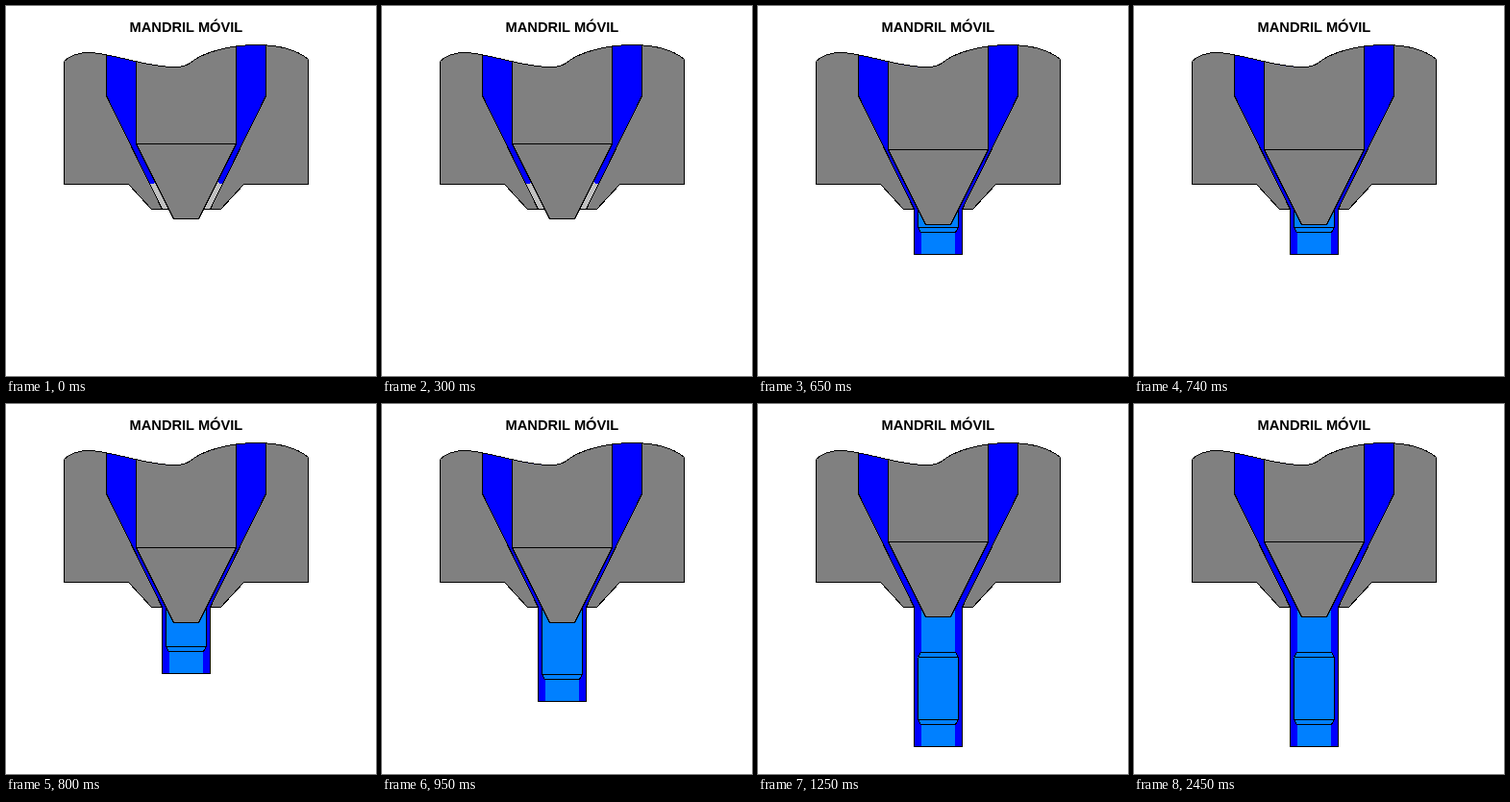
An HTML page that plays this animation: 385x385 px, repeating every 3250 ms.

```html
<!DOCTYPE html>
<html lang="es">
<head>
<meta charset="utf-8">
<title>Mandril móvil</title>
<style>
html, body { margin: 0; width: 100%; height: 100%; overflow: hidden; background: #fff; }
svg { display: block; }
.shape { shape-rendering: crispEdges; fill: none; }
.line { stroke: #000; stroke-width: 1; }
.steel { fill: #808080; }
.melt { fill: #00f; }
.bore { fill: #0080ff; }
text { font: bold 14.67px "Liberation Sans", Arial, sans-serif; }
</style>
</head>
<body>
<svg width="385" height="385" viewBox="0 0 385 385">
  <defs>
    <clipPath id="below"><path id="belowPath"/></clipPath>
  </defs>
  <text x="128.5" y="27">MANDRIL MÓVIL</text>
  <g class="shape" transform="translate(.5 .5)">
    <g clip-path="url(#below)">
      <path class="steel" d="M60 0V185H127L151 211H223L247 185H314V0Z"/>
      <path id="funnel" d="M104 0V93L162 211H212L270 93V0Z"/>
      <path id="front" class="melt" d="M104 0V93L149 184L152 185L156 181V0ZM270 0V93L225 184L222 185L218 181V0Z"/>
      <path id="tube" class="melt"/>
      <path id="bore" class="bore"/>
      <path id="edges" class="line"/>
      <path class="line" d="M104 0V93L162 211H151L127 185H60V0M270 0V93L212 211H223L247 185H314V0"/>
      <path id="lip" class="line" d="M162 211H212"/>
      <g id="mandrel">
        <path class="steel line" d="M135 -20V143L174 221H200L239 143V-20Z"/>
        <path class="line" d="M135 143H239"/>
      </g>
    </g>
    <path id="top" class="line"/>
  </g>
</svg>
<script>
const el = id => document.getElementById(id);
const set = (id, name, value) => el(id).setAttribute(name, value);
const show = (id, on) => set(id, 'visibility', on ? 'visible' : 'hidden');

const LOOP = 3250, EXIT = 211, CHAMFER = 5;
const steps = [
  { at: 0, end: 0 },
  { at: 500, end: 240 },
  { at: 650, end: 258, drop: 6, low: 235 },
  { at: 800, end: 280, drop: 6, low: 257 },
  { at: 950, end: 309, drop: 6, low: 286 },
  { at: 1100, end: 322, high: 224, low: 299 },
  { at: 1250, end: 356, high: 258, low: 333 }
];

const curve = 'M60 57C66 51 76 48 86 48C112 49 145 63 174 63C186 63 190 60 195 56C206 48 232 40 260 40C285 40 303 46 314 55';
set('top', 'd', curve);
set('belowPath', 'd', curve + 'H315V385H59.5V57Z');

// Bore outline: narrow ends, widened between the two chamfers.
function boreShape({ end, high, low }) {
  if (!low) return `M169.5 ${EXIT}V${end}H204.5V${EXIT}Z`;
  const wide = low - CHAMFER;
  const left = high
    ? `M169.5 ${EXIT}V${high}L166 ${high + CHAMFER}`
    : `M166 ${EXIT}`;
  const right = high
    ? `L208 ${high + CHAMFER}L204.5 ${high}V${EXIT}Z`
    : `V${EXIT}Z`;
  return `${left}V${wide}L169.5 ${low}V${end}H204.5V${low}L208 ${wide}${right}`;
}

function edgeLines({ end, high, low }) {
  let d = `M162 ${EXIT}V${end}H212V${EXIT}`;
  if (!low) return d;
  const wide = low - CHAMFER;
  const start = high ? high + CHAMFER : EXIT;
  d += `M166 ${start}V${wide}H208V${start}M166 ${wide}L169 ${low}H205L208 ${wide}`;
  if (high) d += `M166 ${start}H208M166 ${start}L169 ${high}H205L208 ${start}`;
  return d;
}

let current;
function draw(time) {
  const t = time % LOOP;
  const step = steps.findLast(s => s.at <= t);
  if (step === current) return;
  current = step;
  const flowing = step.end > 0;
  set('funnel', 'fill', flowing ? '#00f' : '#c0c0c0');
  show('front', !flowing);
  show('lip', !flowing);
  for (const id of ['tube', 'bore', 'edges']) show(id, flowing);
  set('mandrel', 'transform', `translate(0 ${step.drop || 0})`);
  if (!flowing) return;
  set('tube', 'd', `M162 ${EXIT}V${step.end}H212V${EXIT}Z`);
  set('bore', 'd', boreShape(step));
  set('edges', 'd', edgeLines(step));
}

const origin = performance.now();
function tick() {
  draw(performance.now() - origin);
  requestAnimationFrame(tick);
}
tick();
</script>
</body>
</html>
```
